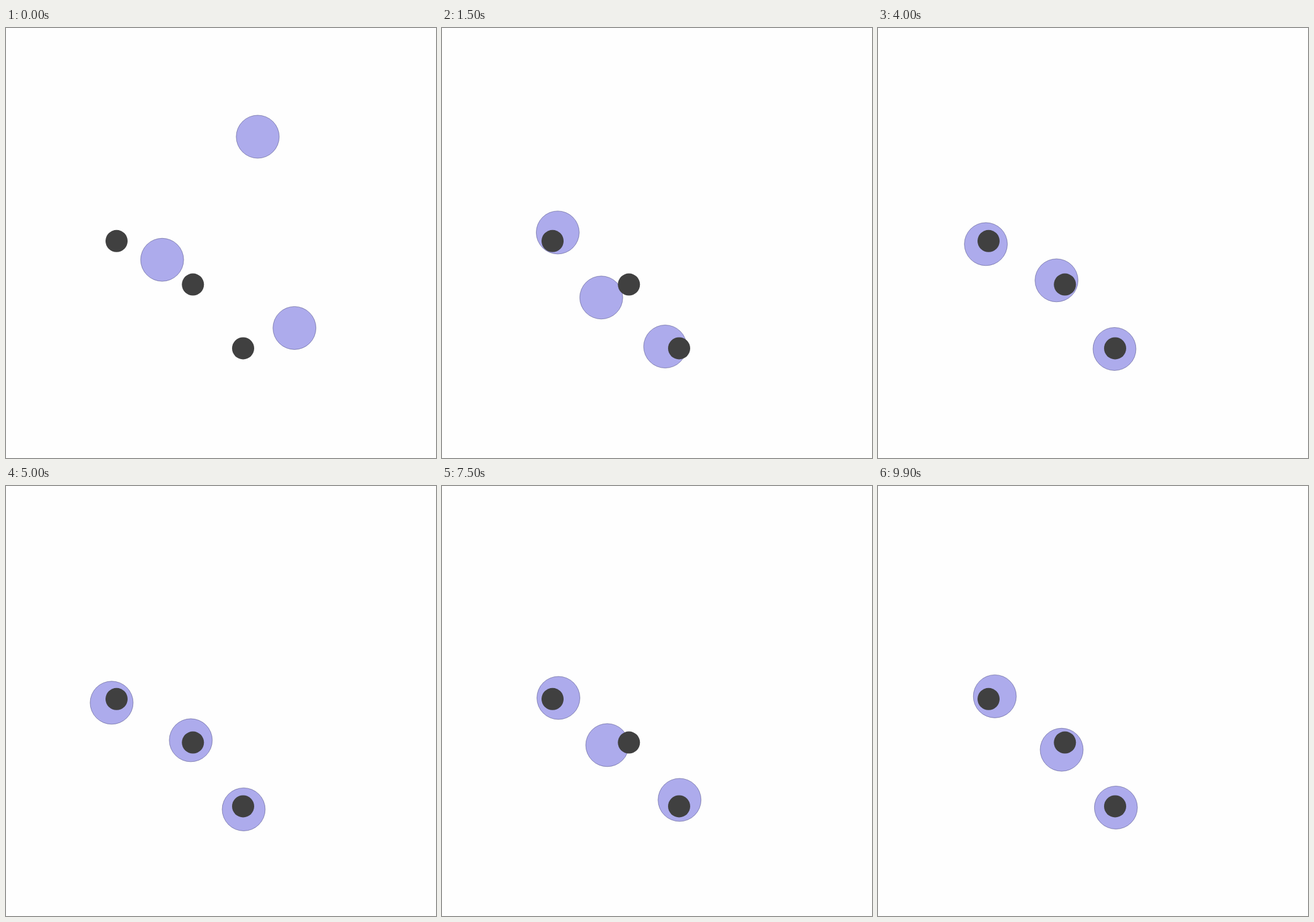
These frames come from a looping animation (700x700 px, 10000 ms). An HTML page with a canvas:

```html
<!DOCTYPE html>
<html lang="en">
<head>
<meta charset="utf-8">
<title>Three agents, three landmarks</title>
<style>
html, body { margin: 0; width: 100%; height: 100%; overflow: hidden; background: #fefefe; }
canvas { display: block; width: 700px; height: 700px; }
</style>
</head>
<body>
<canvas id="stage" width="700" height="700"></canvas>
<script>
const ctx = document.getElementById('stage').getContext('2d');
const STEP = 100, STEPS = 100;
const ARRIVAL = 23;

const landmarks = [[180, 346.8], [304.3, 417.6], [386, 521.4]];

// Steps at which every agent has a known position
const times = [0, 7, 13, ARRIVAL, 40, 60, 75, 99];

// path: positions at those steps; sway: how far the agent drifts between them after arrival
const agents = [
  { sway: [-4, -12],
    path: [[409.8, 177], [264.5, 186], [201, 312], [170, 343.5],
           [175.6, 351.8], [171, 351.3], [189.5, 345], [190.2, 342.4]] },
  { sway: [4, -2],
    path: [[254.2, 377.3], [218.8, 425], [248, 438], [303.2, 429.8],
           [290.6, 410.8], [305.9, 420.2], [269, 421.8], [299, 429.3]] },
  { sway: [13, 4],
    path: [[469.6, 488.4], [375.3, 499.8], [362, 516], [385.2, 519],
           [385, 522.5], [388.5, 526.8], [386.7, 511], [387.3, 523.5]] }
];

// Speed through key i, weighted towards the shorter neighbouring span
function speed(path, i, axis) {
  if (i === 0 || i === times.length - 1) return 0;
  const before = times[i] - times[i - 1], after = times[i + 1] - times[i];
  const inRate = (path[i][axis] - path[i - 1][axis]) / before;
  const outRate = (path[i + 1][axis] - path[i][axis]) / after;
  return (inRate * after + outRate * before) / (before + after);
}

// Cubic Hermite path plus a drift that vanishes at each key
function place({ path, sway }, step) {
  let i = 0;
  while (i < times.length - 2 && step >= times[i + 1]) i++;
  const span = times[i + 1] - times[i];
  const u = (step - times[i]) / span, v = 1 - u;
  const drift = step > ARRIVAL ? Math.sin(2 * Math.PI * u) ** 2 : 0;
  return [0, 1].map(axis =>
    v * v * (1 + 2 * u) * path[i][axis] + u * u * (3 - 2 * u) * path[i + 1][axis] +
    span * u * v * (v * speed(path, i, axis) - u * speed(path, i + 1, axis)) +
    drift * sway[axis]);
}

function disc([x, y], radius, fill, line) {
  ctx.beginPath();
  ctx.arc(x, y, radius, 0, Math.PI * 2);
  ctx.fillStyle = fill;
  ctx.fill();
  if (!line) return;
  ctx.strokeStyle = line;
  ctx.stroke();
}

function draw(step) {
  ctx.fillStyle = '#fefefe';
  ctx.fillRect(0, 0, 700, 700);
  for (const agent of agents) disc(place(agent, step), 35, '#adabec', 'rgba(45, 45, 108, 0.45)');
  for (const spot of landmarks) disc(spot, 18, '#404040');
}

const start = performance.now();
function tick() {
  draw(Math.floor((performance.now() - start) / STEP) % STEPS);
  requestAnimationFrame(tick);
}
tick();
</script>
</body>
</html>
```
